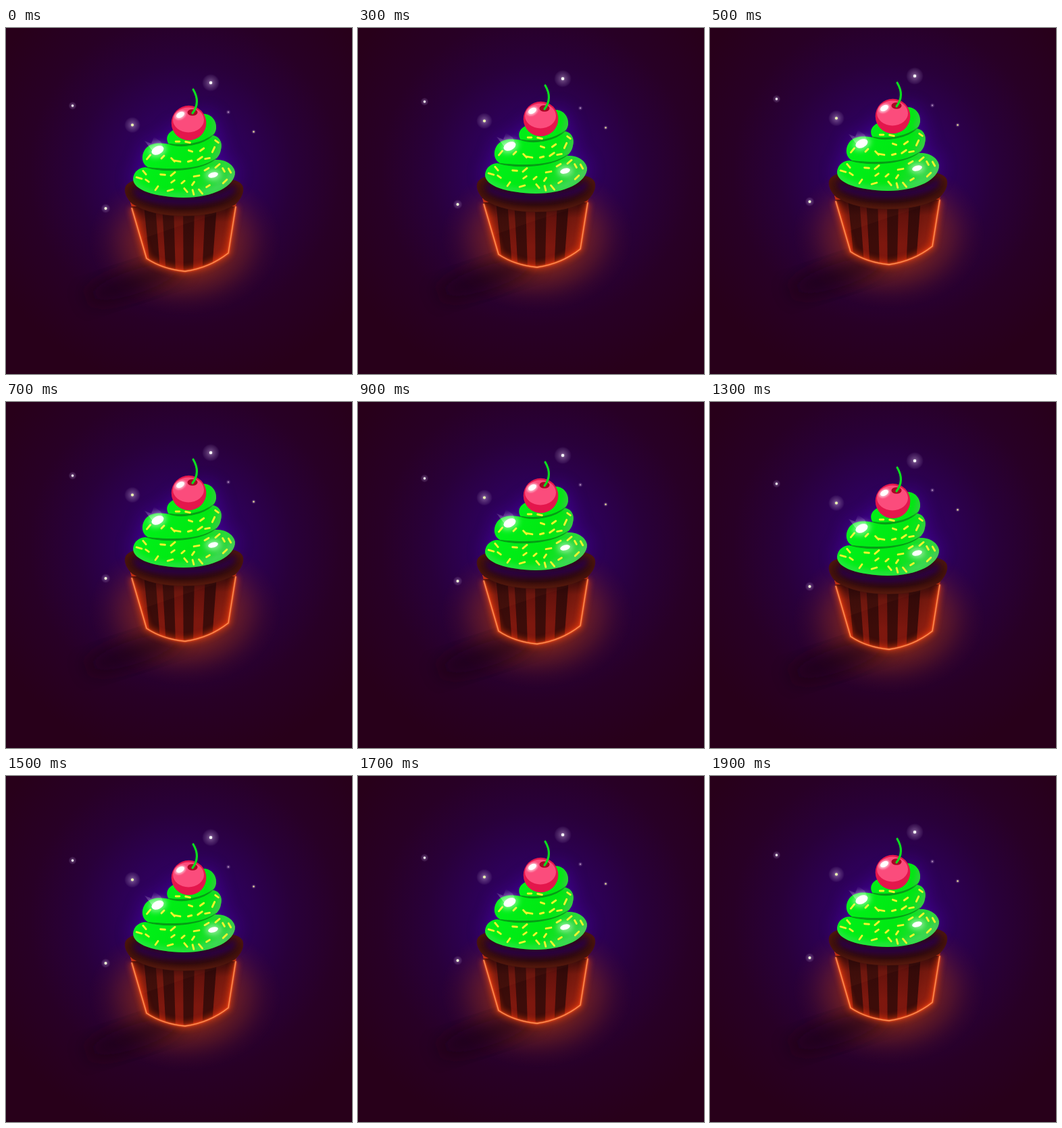
Recreate the animation shown at these times as an HTML page. Size 512x512 px, loop 2000 ms.

```html
<!DOCTYPE html>
<html lang="en">
<head>
<meta charset="utf-8">
<title>Floating cupcake</title>
<style>
  html, body { margin: 0; width: 100%; height: 100%; overflow: hidden; background: #270019; }
  svg { display: block; width: 100%; height: 100%; }
</style>
</head>
<body>
<svg viewBox="0 0 512 512">
  <defs>
    <radialGradient id="night" gradientUnits="userSpaceOnUse" cx="264" cy="212" r="320">
      <stop offset="0" stop-color="#360076"/>
      <stop offset=".3" stop-color="#2d0055"/>
      <stop offset=".5" stop-color="#29003a"/>
      <stop offset=".72" stop-color="#280026"/>
      <stop offset="1" stop-color="#28001a"/>
    </radialGradient>
    <radialGradient id="ember">
      <stop offset="0" stop-color="#c04008" stop-opacity=".75"/>
      <stop offset=".5" stop-color="#a83808" stop-opacity=".52"/>
      <stop offset=".68" stop-color="#903010" stop-opacity=".33"/>
      <stop offset=".85" stop-color="#702018" stop-opacity=".14"/>
      <stop offset="1" stop-color="#601020" stop-opacity="0"/>
    </radialGradient>
    <radialGradient id="halo">
      <stop offset="0" stop-color="#fff" stop-opacity=".65"/>
      <stop offset=".3" stop-color="#c0a0d0" stop-opacity=".38"/>
      <stop offset=".8" stop-color="#9070a8" stop-opacity=".18"/>
      <stop offset="1" stop-color="#9060b0" stop-opacity="0"/>
    </radialGradient>
    <linearGradient id="paper">
      <stop offset="0" stop-color="#b82a12"/>
      <stop offset=".2" stop-color="#7e180e"/>
      <stop offset=".7" stop-color="#7c170e"/>
      <stop offset="1" stop-color="#a02612"/>
    </linearGradient>
    <linearGradient id="cupShade" x2="0" y2="1">
      <stop offset="0" stop-color="#200408" stop-opacity=".85"/>
      <stop offset=".35" stop-color="#200408" stop-opacity=".25"/>
      <stop offset="1" stop-color="#200408" stop-opacity="0"/>
    </linearGradient>
    <radialGradient id="rim" cx=".5" cy=".42" r=".56">
      <stop offset="0" stop-color="#28060c"/>
      <stop offset=".7" stop-color="#30090a"/>
      <stop offset="1" stop-color="#54180c"/>
    </radialGradient>
    <linearGradient id="cream" x2="1" y2=".35">
      <stop offset="0" stop-color="#28ee38"/>
      <stop offset=".3" stop-color="#00f018"/>
      <stop offset=".75" stop-color="#00e812"/>
      <stop offset="1" stop-color="#2cd83c"/>
    </linearGradient>
    <linearGradient id="ray" x2="0" y2="1">
      <stop offset="0" stop-color="#fff" stop-opacity="0"/>
      <stop offset="1" stop-color="#fff" stop-opacity=".4"/>
    </linearGradient>
    <filter id="soft" x="-50%" y="-50%" width="200%" height="200%"><feGaussianBlur stdDeviation="14"/></filter>
    <filter id="glow" x="-50%" y="-50%" width="200%" height="200%"><feGaussianBlur stdDeviation="4"/></filter>
    <filter id="hair" x="-20%" y="-20%" width="140%" height="140%"><feGaussianBlur stdDeviation="1"/></filter>
    <path id="body" d="M184 258L207 341Q232 358 265 360Q301 355 329 333L341 258Z"/>
    <path id="edge" d="M186 266L208 341Q232 357 265 360Q301 355 329 333L340 264"/>
    <path id="swirl" d="M188 223C189 211 199 205 210 206C199 200 200 185 208 177C217 169 229 170 241 172C234 162 241 152 253 149L293 127C306 128 312 139 311 149C310 154 308 157 306 159C316 160 321 170 318 180C317 187 313 192 309 195C325 194 337 202 339 213C339 234 307 251 263 251C220 250 188 240 188 223Z"/>
    <path id="rimShape" d="M177 235C181 225 204 220 263 220C323 220 346 224 350 234C353 243 347 254 339 261C319 273 294 278 264 278C231 278 206 272 187 260C179 253 174 242 177 235Z"/>
    <clipPath id="bodyClip"><use href="#body"/></clipPath>
    <clipPath id="swirlClip"><use href="#swirl"/></clipPath>
    <clipPath id="rimClip"><use href="#rimShape"/></clipPath>
  </defs>

  <rect width="512" height="512" fill="url(#night)"/>

  <g id="floating">
    <ellipse cx="265" cy="314" rx="142" ry="112" fill="url(#ember)"/>
    <ellipse cx="190" cy="376" rx="76" ry="17" transform="rotate(-18 190 376)" fill="#1b000d" opacity=".65" filter="url(#soft)"/>
    <use href="#swirl" fill="#4c00b8" opacity=".65" filter="url(#soft)"/>
    <g id="stars"></g>

    <use href="#edge" fill="none" stroke="#ff4a10" stroke-width="8" opacity=".5" filter="url(#glow)"/>
    <use href="#body" fill="url(#paper)"/>
    <g clip-path="url(#bodyClip)">
      <g id="stripes" fill="#3c0c09"></g>
      <path d="M184 318L265 290L341 266V258H184Z" fill="#ff6030" opacity=".06"/>
      <rect x="180" y="264" width="166" height="66" fill="url(#cupShade)"/>
      <use href="#edge" fill="none" stroke="#ff3e10" stroke-width="8" opacity=".6" filter="url(#glow)"/>
    </g>
    <use href="#edge" fill="none" stroke="#ff5a1c" stroke-width="2.6" filter="url(#hair)"/>
    <use href="#edge" fill="none" stroke="#ff9458" stroke-width="1.3"/>

    <use href="#rimShape" fill="url(#rim)" stroke="#4b160d" stroke-width="1" stroke-opacity=".7"/>
    <g clip-path="url(#rimClip)">
      <path d="M188 232C203 259 322 259 340 228L338 243C313 267 213 267 191 247Z" fill="#2a0048" filter="url(#glow)"/>
    </g>

    <use href="#swirl" fill="url(#cream)"/>
    <g clip-path="url(#swirlClip)">
      <path d="M186 224C194 254 304 264 341 214" fill="none" stroke="#58dc78" stroke-width="8" opacity=".55" filter="url(#glow)"/>
      <path d="M207 206C238 215 289 211 311 193C292 208 258 212 207 206Z" fill="#079c16" stroke="#079c16" stroke-width="1.2"/>
      <path d="M239 171C260 179 292 173 308 157C290 172 264 175 239 171Z" fill="#079c16" stroke="#079c16" stroke-width="1.2"/>
      <path d="M308 126Q316 146 304 160M318 160Q325 179 308 195M338 200Q346 220 324 238" fill="none" stroke="#54b85c" stroke-width="9" opacity=".65" filter="url(#glow)"/>
    </g>
    <g id="sprinkles" stroke="#f0f52c" stroke-width="2.9" stroke-linecap="round"></g>

    <path d="M216 181L205 167L215 171L219 161L229 168L232 175Z" fill="url(#ray)"/>
    <g fill="#fff">
      <ellipse cx="224.5" cy="181" rx="13" ry="9" transform="rotate(-25 224.5 181)" opacity=".55" filter="url(#glow)"/>
      <ellipse cx="224.5" cy="181" rx="9.5" ry="6" transform="rotate(-25 224.5 181)"/>
      <ellipse cx="306.5" cy="217.5" rx="11" ry="7" opacity=".55" filter="url(#glow)"/>
      <ellipse cx="306.5" cy="217.5" rx="7.5" ry="3.8" transform="rotate(-15 306.5 217.5)"/>
    </g>

    <circle cx="270.5" cy="140.5" r="25.8" fill="#e4164c"/>
    <ellipse cx="270" cy="136" rx="23" ry="18.5" fill="#fb4c7c"/>
    <ellipse cx="276" cy="125" rx="7.5" ry="4.8" fill="#a80625"/>
    <path d="M277 91C283 101 286 113 276 126" fill="none" stroke="#0cdc20" stroke-width="3.2" stroke-linecap="round"/>
    <ellipse cx="258" cy="129" rx="9" ry="6" transform="rotate(-30 258 129)" fill="#fff" opacity=".5" filter="url(#hair)"/>
    <ellipse cx="258" cy="128.5" rx="6.5" ry="4" transform="rotate(-30 258 128.5)" fill="#fff"/>
  </g>
</svg>
<script>
  const byId = id => document.getElementById(id);
  const add = (parent, tag, attrs) => {
    const node = document.createElementNS(parent.namespaceURI, tag);
    for (const [key, value] of Object.entries(attrs)) node.setAttribute(key, value);
    parent.append(node);
  };

  // x, y, halo radius, core radius, core colour
  const stars = [
    [303, 81, 13, 2.2, '#fff'], [187, 143.5, 12, 2, '#f0ffb0'],
    [98.5, 115, 6, 1.7, '#fff'], [147.5, 267, 7, 2, '#f4ffd8'],
    [366.5, 153.5, 3.5, 1.2, '#e8dc90'], [329, 124.5, 3.5, 1, '#b890c0']
  ];
  for (const [cx, cy, halo, core, color] of stars) {
    add(byId('stars'), 'circle', { cx, cy, r: halo, fill: 'url(#halo)' });
    add(byId('stars'), 'circle', { cx, cy, r: core, fill: color });
  }

  // Stripes lean towards the middle of the narrower base
  const lean = x => 266 + (x - 266) * 0.84;
  for (const x of [204, 231, 262, 295]) {
    const right = x + 17;
    add(byId('stripes'), 'path', { d: `M${x} 262L${lean(x)} 362H${lean(right)}L${right} 262Z` });
  }

  // x, y, angle
  const sprinkles = [
    [254, 168, 0], [269, 169, 12],
    [211, 191, -50], [232, 191, -45], [247, 195, 45], [254, 197, 10],
    [273, 182, 20], [290, 180, -35], [307, 180, -65], [312, 168, 35],
    [298, 193, -10], [287, 193, -35], [272, 197, -15],
    [205, 214, 50], [197, 222, 15], [209, 226, 35], [232, 217, 5],
    [247, 216, -40], [247, 227, -35], [223, 237, -55], [243, 240, -15],
    [262, 228, -40], [266, 240, 50], [282, 219, -10], [277, 230, -55],
    [277, 243, 75], [288, 242, 50], [299, 234, -30], [297, 209, -30],
    [313, 204, -40], [322, 210, 60], [331, 211, 60], [324, 227, -45]
  ];
  sprinkles.forEach(([x, y, angle], i) => {
    const half = 2.8 + i % 3 * 0.6;
    add(byId('sprinkles'), 'line', {
      x1: -half, x2: half, transform: `translate(${x} ${y}) rotate(${angle})`
    });
  });

  // Constant speed up and down, one 2px step every 100 ms
  const shift = y => `translate(0px, ${y}px)`;
  byId('floating').animate([
    { offset: 0, transform: shift(0), easing: 'steps(5)' },
    { offset: 0.25, transform: shift(-10), easing: 'steps(10)' },
    { offset: 0.75, transform: shift(10), easing: 'steps(5)' },
    { offset: 1, transform: shift(0) }
  ], { duration: 2000, iterations: Infinity });
</script>
</body>
</html>
```
